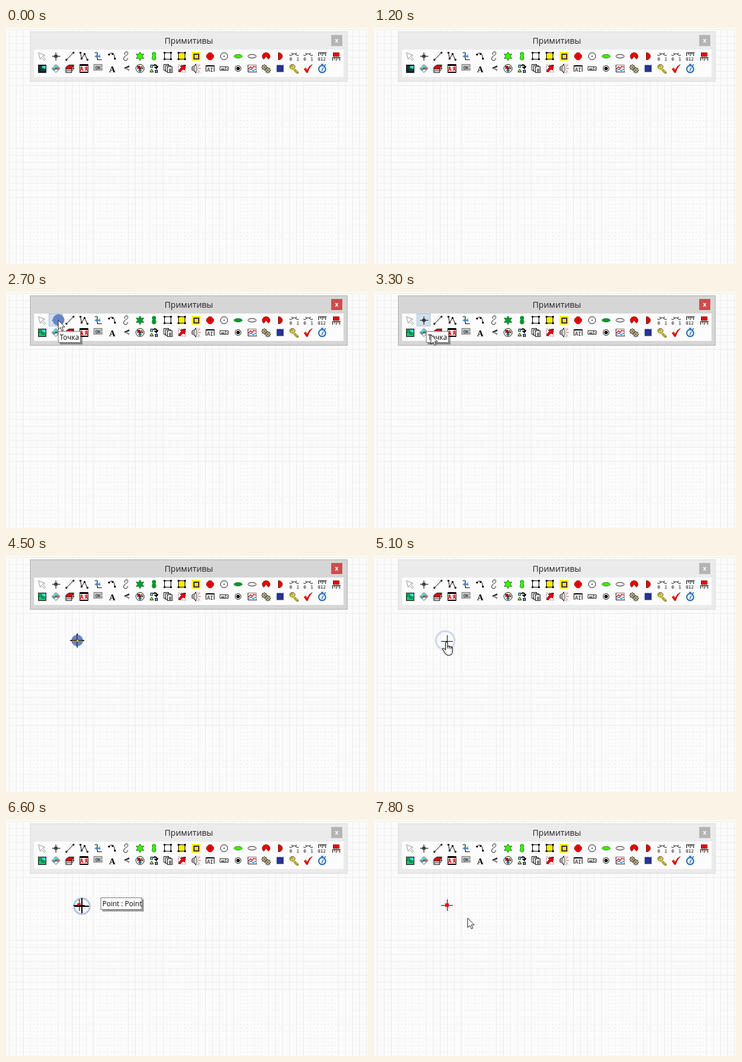
An HTML page that plays this animation: 620x405 px, repeating every 8000 ms.

```html
<!DOCTYPE html>
<html lang="ru">
<head>
<meta charset="utf-8">
<style>
html, body { margin: 0; width: 100%; height: 100%; overflow: hidden; background: #fbfbfb; }
svg { display: block; width: 620px; height: 405px; }
text { font-family: "Open Sans", "Noto Sans", sans-serif; }
.mono { font-family: "DejaVu Sans Mono", monospace; }
.serif { font-family: "Liberation Serif", serif; font-weight: bold; }
.crisp { shape-rendering: crispEdges; }
</style>
</head>
<body>
<svg id="stage" viewBox="0 0 620 405" xmlns="http://www.w3.org/2000/svg"></svg>
<script>
const STEP = 300, LOOP = 8000;
const RED = '#f00000', YEL = '#fff000', CYAN = '#3fd8e0';
const GREEN = 'var(--green)', PIC = 'var(--pic)';

const path = (d, fill = 'none', stroke = '#000', w = 1) =>
  `<path d="${d}" fill="${fill}" stroke="${stroke}" stroke-width="${w}"/>`;
const rect = (x, y, w, h, fill, stroke = 'none') =>
  `<rect x="${x}" y="${y}" width="${w}" height="${h}" fill="${fill}" stroke="${stroke}"/>`;
const oval = (x, y, rx, ry, fill = 'none', stroke = '#000', w = 1) =>
  `<ellipse cx="${x}" cy="${y}" rx="${rx}" ry="${ry}" fill="${fill}" stroke="${stroke}" stroke-width="${w}"/>`;
const text = (x, y, size, str, more = '') =>
  `<text x="${x}" y="${y}" font-size="${size}" ${more}>${str}</text>`;
const group = (x, y, body) => `<g transform="translate(${x} ${y})">${body}</g>`;
const crisp = body => `<g class="crisp">${body}</g>`;
const dots = (...pts) => pts.map(([x, y]) => rect(x - 1.5, y - 1.5, 3, 3, '#000')).join('');
const mono = 'class="mono"', serif = 'class="serif"';

function star(n, r1, r2) {
  const pts = [];
  for (let i = 0; i < 2 * n; i++) {
    const a = Math.PI * i / n - Math.PI / 2, r = i % 2 ? r2 : r1;
    pts.push((r * Math.cos(a)).toFixed(1) + ' ' + (r * Math.sin(a)).toFixed(1));
  }
  return 'M' + pts.join('L') + 'Z';
}

const frame = fill => crisp(rect(-6, -6, 11, 11, fill, '#000') + dots([-6, -6], [5, -6], [-6, 5], [5, 5]));
const dial = path('M-5 -1Q0 -8 5 -1M-8 -2l3 1M8 -2l-3 1M-4 -6l1 3M4 -6l-1 3') +
  text(-8, 7, 7.5, '0', mono) + text(4, 7, 7.5, '1', mono);
const ruler = y => crisp(path(`M-7 ${y}H7M-6 ${y}v5M-3 ${y}v3M0 ${y}v5M3 ${y}v3M6 ${y}v5`));
const gear = (x, y) => group(x, y, path(star(8, 5, 3.2), '#d5ca8c', '#222') + oval(0, 0, 1, 1, '#fff'));

const topRow = [
  path('M-6 -6L5 -2 1 0 6 5 4 7 -1 2 -3 5Z', '#fff', '#909090'),
  crisp(path('M-7 0H7M0 -7V7') + rect(-2, -2, 4, 4, 'none', '#000')),
  path('M-6 6L6 -6') + dots([-6, 6], [6, -6]),
  path('M-6 -6L-4 4 1 -4 6 6') + dots([-6, -6], [-4, 4], [1, -4], [6, 6]),
  crisp(path('M-6 -6H-1V6H6')) + path('M-6 0H5M-3 -3V3M4 -3L0 0 4 3', 'none', '#1668c0'),
  path('M-5 -2C-3 -8 6 -6 4 4') + dots([-5, -3], [1, -4], [5, 4]),
  path('M-2 -3C-4 -9 5 -9 3 -4C2 -1 -4 0 -4 4C-4 9 4 8 3 3'),
  path(star(6, 7.5, 4), GREEN, '#172'),
  path('M-2 -1C-7 -9 7 -9 2 -1C8 9 -8 9 -2 -1Z', GREEN, '#172'),
  frame('#fff'),
  frame(YEL),
  crisp(rect(-7.5, -7.5, 15, 15, YEL) + path('M-4 -4H4V4H-4Z', YEL, '#333', 2)),
  path('M-2 -6H2L6 -2V2L2 6H-2L-6 2V-2Z', RED, '#800') + oval(0, 0, 1, 1, '#300', 'none'),
  oval(0, 0, 6, 6, '#fff') + oval(0, 0, 1, 1, '#000', 'none'),
  oval(0, 0, 7, 3, GREEN, '#272'),
  oval(0, 0, 7, 3, '#fff'),
  path('M0 0L-4 5C-9 1 -6 -6 0 -6S9 1 4 5Z', RED, '#600'),
  path('M-3 -6C6 -6 6 6 -3 6Z', RED, '#600'),
  dial,
  dial,
  ruler(-6) + text(-7.5, 7, 7.5, '012', mono),
  crisp(rect(-5, -6, 10, 6, RED, '#900')) + ruler(2)
];

const bottomRow = [
  crisp(rect(-6, -6, 13, 13, PIC, '#000') + rect(0, -5, 6, 5, CYAN) +
    path('M-4 0V-3H0V3H4V0H-4', 'none', '#063')),
  path('M0 -7L7 0 0 7 -7 0Z', '#fff', '#555') + path('M0 -6L3 -3 0 0 -3 -3Z', CYAN, 'none') +
    path('M3 -3L6 0 3 3 0 0Z', '#cf5555', 'none') + path('M-3 -2L0 1 -3 4 -6 0Z', '#3b9cae', 'none') +
    path('M0 -2L2 0 0 2 -2 0Z', '#356', 'none'),
  [4, 1, -2].map(y => path(`M-7 ${y}L-2 ${y - 4}H7L3 ${y + 1}V${y + 3}H-7Z`, y < 0 ? RED : '#fff')).join(''),
  crisp(rect(-7, -7, 14, 14, '#fff', '#000') + path('M-7 -6H7M-7 6H7', 'none', '#000', 2)) +
    path('M-4 -4V0L-6 4M-4 0L-1 4M-6 -1H-2M4 -4V0L2 4M4 0L6 4M1 -1H6', 'none', RED, 1.5),
  crisp(rect(-7, -7, 14, 10, '#c4c4c4', '#777')) + text(-4.5, 1, 7.5, 'OK', mono),
  text(-5, 6, 15, 'A', serif),
  `<g transform="rotate(-90)">${text(-4, 5, 13, 'A', serif)}</g>`,
  oval(0, 0, 7, 7, '#fff') + rect(-4, -4, 4, 4, RED, '#500') + path('M3 -4L5 0H1Z', YEL) + oval(0, 3, 2, 2, '#59d'),
  rect(-6, -6, 4, 4, CYAN, '#333') + path('M-1 -5C3 -8 6 -4 4 -1M1 -3L4 0 7 -4', 'none', '#000', 2) +
    path('M-4 1L-1 6H-7Z', YEL) + rect(2, 3, 4, 4, '#48c', '#222'),
  [-7, -4, -1].map(o => crisp(rect(o, Math.round(o * .7) - 2, 8, 10, '#fff', '#000'))).join('') +
    crisp(path('M1 1H5M1 3H5M1 5H5')),
  '<g stroke-dasharray="2 2">' + rect(-6, -6, 12, 12, '#fff', '#555') + '</g>' +
    path('M6 -6L4 3 2 1 -4 6 -6 4 -1 -2 -3 -4Z', RED, '#500'),
  path('M-7 -3H-5L0 -8V8L-5 3H-7Z', '#bbb', '#333') + oval(-1, 0, 2.5, 6, '#ddd', '#444') +
    path('M3 -3L7 -7M4 0H8M3 3L7 7M3 -6L4 -8M3 6L4 8', 'none', '#e33'),
  crisp(path('M-7 5V-5H7V5M-7 -4H7')) + text(-5.5, 5, 9, 'AI', mono),
  crisp(rect(-7, -3, 14, 6, '#fff', '#222') + path('M-4 -1V2M-2 -1V2M0 -1V2M3 -3V3M5 0H6')),
  oval(0, 0, 5, 5, '#fff') + oval(0, 0, 3, 3, '#000', 'none'),
  crisp(rect(-7, -6, 14, 12, '#fff', '#777') + path('M-7 -7V6H8', 'none', '#222')) +
    path('M-6 1L-3 -3 0 0 3 -4 7 -2', 'none', RED, 1.3) + path('M-6 4L-2 1 2 4 7 1', 'none', '#27b', 1.3),
  gear(-3, -2) + gear(3, 3),
  rect(-6, -6, 12, 12, '#24348f'),
  path('M1 1L7 6V8H4L-1 2', '#e8c900', '#443') + oval(-3, -3, 4.5, 4, '#f5dc20', '#443') +
    oval(-4, -4, 1.2, 1.2, '#fff', '#443'),
  path('M-7 1L-4 -1 -2 3Q2 -5 7 -7Q1 0 -1 7H-3Z', RED, '#a00', .7),
  oval(0, 1, 6, 6, '#d8edff', '#2869b5', 2) + path('M-2 -7H2M0 -7V-5M4 -5L6 -7', 'none', '#2869b5', 2) +
    path('M0 1L3 -2M0 1V4', 'none', '#234')
];

const iconRow = (icons, y) => icons.map((body, i) => group(61.5 + 24 * i, y + .5, body)).join('');

// Grid lines turn into dots in regular bands
function grid() {
  let solid = '', dotted = '';
  for (let x = 5.5; x < 620; x += 12) {
    const d = `M${x} 2V405`;
    if (x % 120 > 30 && x % 120 < 84) dotted += d; else solid += d;
  }
  for (let y = 2.5; y < 405; y += 12) {
    const d = `M5 ${y}H620`;
    if (y % 200 > 100) dotted += d; else solid += d;
  }
  return crisp(path(solid, 'none', '#ececec') +
    `<g stroke-dasharray="2 4">${path(dotted, 'none', '#e8e8e8')}</g>`);
}

const tip = (id, x, y, w, h, str) => `<g id="${id}">` +
  rect(x + 3, y + 3, w, h, 'rgba(0,0,0,.38)') + rect(x + .5, y + .5, w - 1, h - 1, '#fff', '#777') +
  text(x + 3, y + 15, 12, str) + '</g>';

const stage = document.getElementById('stage');
stage.innerHTML =
  grid() +
  '<g class="crisp"><rect id="panel" x="41.5" y="6.5" width="543" height="85"/>' +
  rect(48, 37, 530, 47, '#fcfcfc') +
  '<rect id="close" x="557" y="12" width="19" height="19"/>' +
  '<rect id="hot" x="73.5" y="37.5" width="23" height="21" stroke="#a8c9df"/></g>' +
  text(313, 27, 14.4, 'Примитивы', 'text-anchor="middle" fill="#222"') +
  text(566.5, 25, 10, 'x', 'text-anchor="middle" fill="#fff" font-weight="bold"') +
  iconRow(topRow, 48) + iconRow(bottomRow, 69) +
  tip('hint', 89, 67, 39, 20, 'Точка') +
  tip('name', 162, 133, 71, 21, 'Point : Point') +
  '<circle id="pulse"/>' +
  '<g id="point" class="crisp">' + path('M115 146.5H135M125.5 136V156') + '</g>' +
  '<g id="mark" class="crisp">' + rect(122, 143, 6, 6, RED) + '</g>' +
  '<g id="arrow">' + path('M.5 .5V16.5L4.3 13 6.8 18.8 9.3 17.7 6.8 12H11.8Z', '#fff', '#222') + '</g>' +
  '<g id="cross">' + crisp(path('M-12 0H12M0 -12V12', 'none', '#2a2618', 2) +
    path('M-9 0H9M0 -9V11', 'none', '#7d6a1c') + rect(-1, -1, 3, 3, '#d8c030')) + '</g>' +
  '<g id="move" class="crisp">' + path('M-13 0H12M0 -14V12', 'none', '#000', 2) + '</g>' +
  '<g id="hand">' + path('M-1.5 1.5C-1.5 -1 2 -1 2 1.5V7C3 5.8 5 6 5 7.7C6 6.6 8 7 8 8.5C9 7.7 10.5 8.4 10.5 10V15C10.5 20 8 22.5 4 22.5C0 22.5 -2 20 -4 16L-6.5 12C-7 9.5 -4 9.5 -1.5 13Z', '#fff', '#111', 1.2) +
    path('M2 7V11M5 8V11M8 9V12') + '</g>';

const el = id => document.getElementById(id);
const show = (id, on) => el(id).setAttribute('visibility', on ? 'visible' : 'hidden');
const set = (id, attrs) => { for (const k in attrs) el(id).setAttribute(k, attrs[k]); };

// Pointer stops: step, x, y
const stops = [[5, 176, 150], [6, 120, 85], [7, 89, 48], [9, 89, 48], [10, 91, 50], [11, 97, 73],
  [14, 122, 145], [16, 122, 145], [17, 124, 148], [20, 125, 148], [21, 130, 148], [23, 130, 148],
  [24, 142, 156], [26, 160, 168]];
// Clicks: first step, number of steps, x, y
const clicks = [[9, 2, 90, 48], [15, 3, 122, 145], [21, 3, 130, 148]];
const pulseLooks = [
  { r: 10, fill: '#6685c5', stroke: 'none' },
  { r: 13.5, fill: 'none', stroke: '#b5c0e0' },
  { r: 16, fill: 'none', stroke: '#ccd5f1' }
];

function pointerAt(n) {
  const i = stops.findIndex(s => s[0] >= n);
  const b = stops[i], a = stops[Math.max(0, i - 1)];
  const k = b[0] === a[0] ? 1 : (n - a[0]) / (b[0] - a[0]);
  return [1, 2].map(j => Math.round(a[j] + (b[j] - a[j]) * k));
}

function cursorKind(n) {
  if (n < 5) return '';
  if (n < 13 || n > 23) return 'arrow';
  if (n < 17) return 'cross';
  return n < 21 ? 'hand' : 'move';
}

function draw(ms) {
  const n = Math.floor(ms / STEP);
  const active = n >= 9 && n < 16;
  set('panel', { fill: active ? '#d6d6d6' : '#ebebeb', stroke: active ? '#adadad' : '#d9d9d9' });
  set('close', { fill: active ? '#c75050' : '#b2b4b6' });
  set('hot', { fill: active ? '#d0deec' : '#d1e6f3' });
  stage.style.setProperty('--green', active ? '#0c9a34' : '#43f000');
  stage.style.setProperty('--pic', n > 8 ? '#20bd72' : '#102c32');
  show('hot', n >= 7 && n < 13);
  show('hint', n >= 8 && n < 13);
  show('name', n >= 22 && n < 24);
  show('point', n >= 16);
  show('mark', n >= 21);

  const click = clicks.find(([start, len]) => n >= start && n < start + len);
  show('pulse', click);
  if (click) {
    const [start, , x, y] = click;
    set('pulse', { cx: x, cy: y, 'stroke-width': 3, ...pulseLooks[n - start] });
  }

  const kind = cursorKind(n), [x, y] = pointerAt(n);
  for (const id of ['arrow', 'cross', 'hand', 'move']) show(id, id === kind);
  if (kind) set(kind, { transform: `translate(${x} ${y})` });
}

const began = performance.now();
function tick() {
  draw((performance.now() - began) % LOOP);
  requestAnimationFrame(tick);
}
draw(0);
requestAnimationFrame(tick);
</script>
</body>
</html>
```
